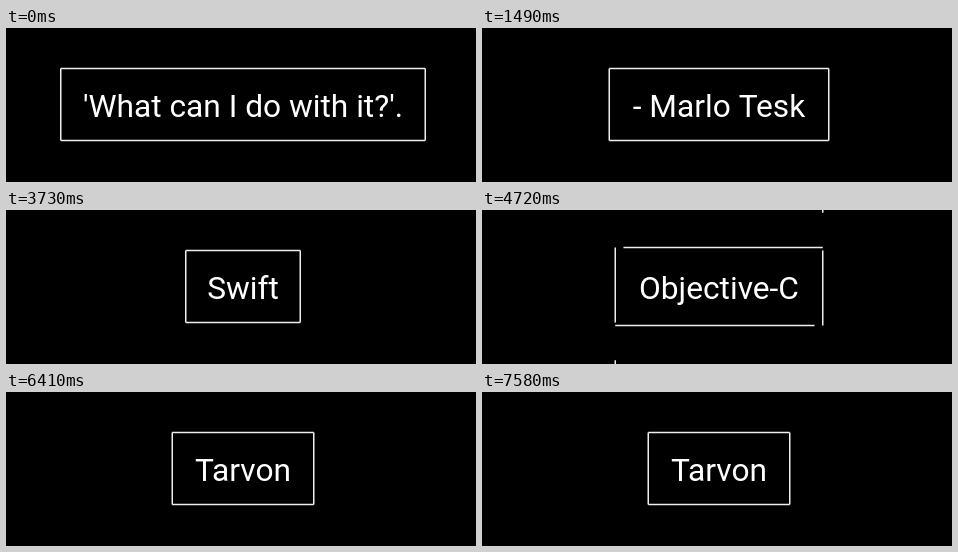
These frames come from a looping animation (470 px wide and 154 px high, 8.31 s). An HTML page with a canvas:

```html
<!DOCTYPE html>
<html>
<head>
<meta charset="utf-8">
<style>
html, body { margin: 0; width: 100%; height: 100%; overflow: hidden; background: #000; }
canvas { display: block; }
</style>
</head>
<body>
<canvas width="470" height="154"></canvas>
<script>
const ctx = document.querySelector('canvas').getContext('2d');
const LOOP = 8310, DURATION = 800, STEP = 56.9;
const CX = 237, CY = 76.5;
// Lines slide in from these distances left of and above the centre.
const FAR_X = 285.6, FAR_Y = 78.5;

// at: when the label appears; lead: how far its motion has run by then
const labels = [
  { text: "'What can I do with it?'.", at: 0, lead: DURATION, w: 364.5, h: 72 },
  { text: '- Marlo Tesk', at: 800, lead: 75, w: 219.5, h: 72 },
  { text: 'Swift', at: 2980, lead: 0, w: 114.5, h: 72 },
  { text: 'Objective-C', at: 4720, lead: 16, w: 207.5, h: 78 },
  { text: 'Tarvon', at: 6410, lead: 0, w: 141.5, h: 72 }
];

function line(x1, y1, x2, y2) {
  ctx.beginPath();
  ctx.moveTo(x1, y1);
  ctx.lineTo(x2, y2);
  ctx.stroke();
}

// Top and right sides, relative to the centre of the box
function drawSides(w, h, p) {
  const x = w / 2, y = h / 2;
  const dx = (FAR_X + x) * (1 - p), dy = (FAR_Y + y) * (1 - p);
  if (p < 1) {
    line(-x + w * p, -y, x, -y);
    line(x, -y + h * p, x, y);
  }
  if (p > 0) {
    line(-x - dx, -y, x - dx, -y);
    line(x, -y - dy, x, y - dy);
  }
}

function draw(t) {
  const { text, at, lead, w, h } = labels.findLast(l => l.at <= t);
  const run = lead + Math.floor((t - at) / STEP) * STEP;
  const p = run > 735 ? 1 : 1 - (1 - run / DURATION) ** 2;

  ctx.fillStyle = '#000';
  ctx.fillRect(0, 0, 470, 154);
  ctx.fillStyle = '#fff';
  ctx.strokeStyle = '#eee';
  ctx.lineWidth = 1.5;
  ctx.font = '31.7px Roboto, sans-serif';
  ctx.textAlign = 'center';
  ctx.fillText(text, CX, 88.8);

  // The bottom and left sides mirror the top and right ones.
  for (const angle of [0, Math.PI]) {
    ctx.save();
    ctx.translate(CX, CY);
    ctx.rotate(angle);
    drawSides(w, h, p);
    ctx.restore();
  }
}

const start = performance.now();
function tick() {
  draw((performance.now() - start) % LOOP);
  requestAnimationFrame(tick);
}
tick();
</script>
</body>
</html>
```
